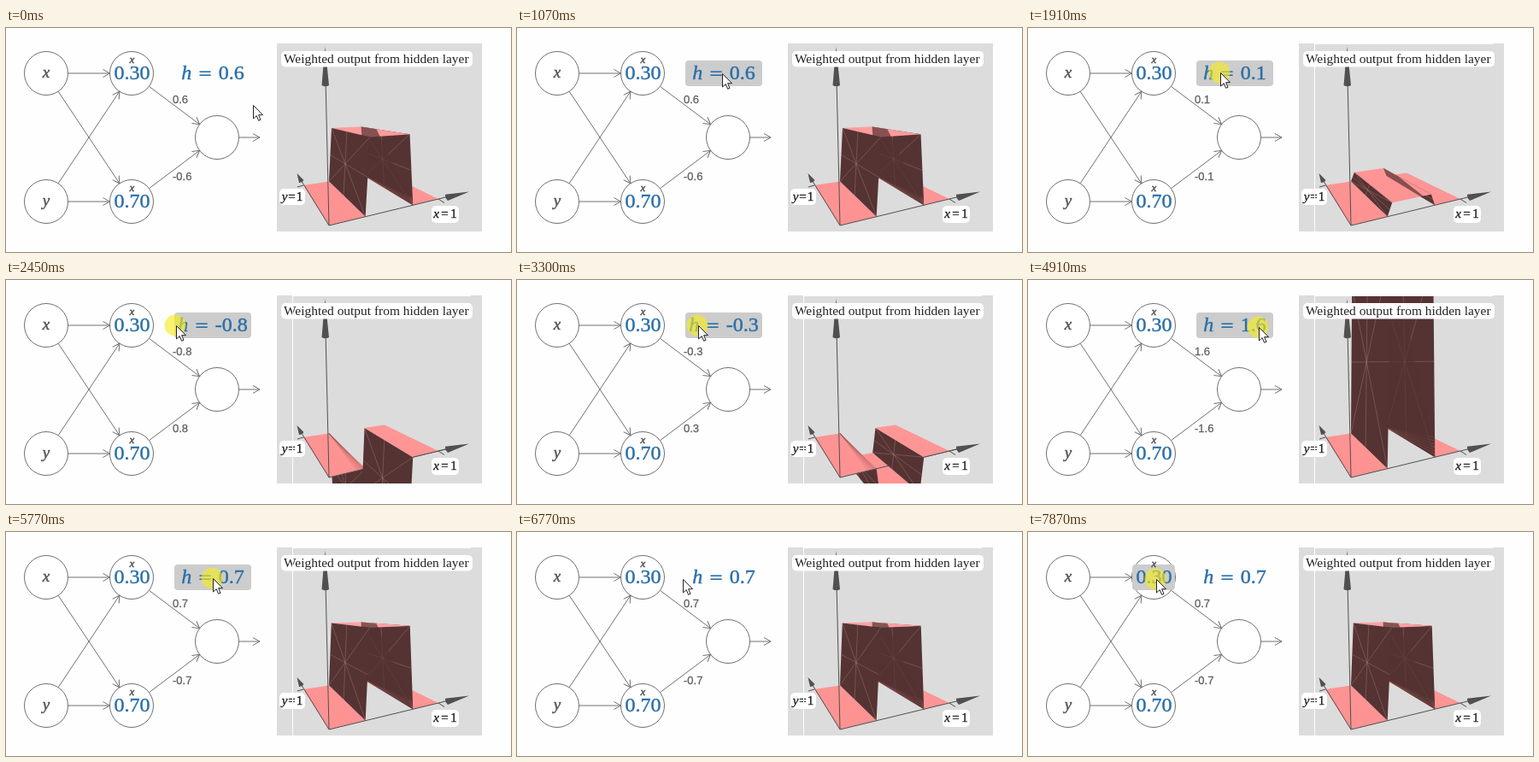
Recreate the animation shown at these times as an HTML page. Size 591 by 262 pixels, loop 8 s.

```html
<!DOCTYPE html>
<html lang="en">
<head>
<meta charset="utf-8">
<title>Weighted output</title>
<style>
html, body { margin: 0; width: 100%; height: 100%; overflow: hidden; background: #fefefe; }
svg { display: block; width: 591px; height: 262px; }
text { font-family: "Liberation Serif", "Times New Roman", serif; }
.mid { text-anchor: middle; }
.var { font-style: italic; fill: #555; stroke: #555; stroke-width: .5px; }
.val { font-size: 24px; fill: #2a6fa8; stroke: #2a6fa8; stroke-width: .45px; }
.eq { font-family: "DejaVu Serif", serif; font-size: 21px; stroke: none; }
.weight { font: 13px "Liberation Sans", Arial, sans-serif; fill: #606060; stroke: #606060; stroke-width: .3px; }
.tag { font-size: 15px; fill: #222; stroke: #222; stroke-width: .35px; }
.net { fill: none; stroke: #707070; stroke-width: 1; }
</style>
</head>
<body>
<svg viewBox="0 0 591 262">
  <defs><clipPath id="clip"><rect x="317" y="18" width="240" height="220"/></clipPath></defs>
  <rect width="591" height="262" fill="#fefefe"/>
  <g id="net" class="net"></g>
  <rect id="hover" y="38" height="30" rx="4" fill="#ccc"/>
  <text class="var mid" x="47" y="57.500" font-size="19">x</text>
  <text class="var mid" x="47" y="207.500" font-size="19">y</text>
  <text class="var mid" x="147.5" y="41" font-size="13">x</text>
  <text class="var mid" x="147.5" y="191" font-size="13">x</text>
  <text class="val mid" x="147.5" y="60">0.30</text>
  <text class="val mid" x="147.5" y="210">0.70</text>
  <text class="val mid" x="242" y="60"><tspan font-style="italic">h</tspan><tspan class="eq" dx="7">=</tspan><tspan id="height" dx="7"></tspan></text>
  <text id="top" class="weight" x="195" y="88"></text>
  <text id="bottom" class="weight" x="195" y="178"></text>
  <rect x="317" y="18" width="240" height="220" fill="#dcdcdc"/>
  <g id="plot" clip-path="url(#clip)"></g>
  <g fill="#fff">
    <rect x="322" y="27" width="224" height="18.500" rx="5"/>
    <rect x="320" y="188" width="30" height="19" rx="5"/>
    <rect x="498" y="208" width="32" height="20" rx="5"/>
  </g>
  <text x="325" y="41" font-size="15.45" fill="#222">Weighted output from hidden layer</text>
  <text class="tag mid" x="335" y="202"><tspan font-style="italic">y</tspan><tspan dx="1">=</tspan><tspan dx="1">1</tspan></text>
  <text class="tag mid" x="514" y="222"><tspan font-style="italic">x</tspan><tspan dx="2.500">=</tspan><tspan dx="2.500">1</tspan></text>
  <path id="seam" d="M335.5 18V238M335 18.500H544" stroke="#fff" fill="none"/>
  <g id="cursor">
    <circle id="press" cx="-1" cy="0" r="12.500" fill="#f4ea20"/>
    <path d="M.5 .5V16L4.200 12.600L6.600 18.300L9 17.300L6.600 11.700H11.500Z" fill="#fff" stroke="#222"/>
  </g>
</svg>
<script>
const $ = id => document.getElementById(id);
const LOOP = 8000, TICK = 76.7;
const PINK = '#fe9090', DARK = '#553333', AXIS = '#505050';
const LOW = 0.28, HIGH = 0.72, RAMP = 0.04;

// Cursor stops: time, x, y
const stops = [
  [0, 289, 90], [470, 289, 90], [1070, 240, 53], [1380, 240, 53],
  [1530, 235, 53], [1690, 235, 53], [1910, 225, 52], [2610, 192, 53],
  [2915, 192, 53], [3300, 212, 53], [3850, 241, 53], [4300, 252, 54],
  [4400, 252, 54], [4910, 270, 55], [5160, 270, 55], [5750, 242, 54],
  [6390, 242, 54], [7070, 152, 56], [7400, 152, 56], [7470, 151, 55],
  [7550, 151, 55], [7700, 150, 55], [8000, 150, 55]
];

function cursorAt(t) {
  const i = Math.max(1, stops.findIndex(s => s[0] >= t));
  const [t0, x0, y0] = stops[i - 1], [t1, x1, y1] = stops[i];
  const k = (t - t0) / (t1 - t0);
  return [x0 + (x1 - x0) * k, y0 + (y1 - y0) * k];
}

// Perspective projection of the unit plot
function project([x, y, z]) {
  const w = 1 + 0.285 * x + 0.536 * y - 0.05 * z;
  return [
    (378 + 272.2 * x + 156.5 * y - 21.85 * z) / w,
    (231 + 26 * x + 51.6 * y - 173.4 * z) / w
  ];
}

const points = list => list.map(p => project(p).map(n => n.toFixed(2)).join(' ')).join('L');
const poly = (list, fill, alpha = 1) => `<path d="M${points(list)}Z" fill="${fill}" opacity="${alpha}"/>`;
const line = (a, b, color, width = 1, alpha = 1) =>
  `<path d="M${points([a, b])}" fill="none" stroke="${color}" stroke-width="${width}" opacity="${alpha}"/>`;

// Strip running the full depth between two x positions
const strip = (x0, z0, x1, z1) => [[x0, 0, z0], [x0, 1, z0], [x1, 1, z1], [x1, 0, z1]];

function facesUp(quad) {
  const p = quad.map(project);
  const area = p.reduce((sum, a, i) => {
    const b = p[(i + 1) % 4];
    return sum + a[0] * b[1] - a[1] * b[0];
  }, 0);
  return area > 0;
}

function sheet(x0, x1, z) {
  const quad = strip(x0, z, x1, z), up = facesUp(quad);
  let s = poly(quad, up ? PINK : DARK);
  if (up) {
    const n = Math.round((x1 - x0) * 45);
    for (let i = 1; i < n; i++) {
      const x = x0 + (x1 - x0) * i / n;
      s += line([x, 0, z], [x, 1, z], '#ffb0b0', 0.5, 0.6);
    }
  }
  return s;
}

function wall(x0, z0, x1, z1) {
  const quad = strip(x0, z0, x1, z1);
  if (Math.abs(z1 - z0) < 0.05) return poly(quad, PINK);
  const xm = (x0 + x1) / 2, zm = (z0 + z1) / 2;
  let s = poly(quad, DARK);
  const rim = [...quad, [xm, 0, zm], [xm, 1, zm], [x0, 0.5, z0], [x1, 0.5, z1]];
  for (const p of rim) s += line([xm, 0.5, zm], p, '#c09090', 0.6, 0.55);
  return s;
}

// Fine strokes where the slope meets the flat part
function fan(x, dx, dz, color) {
  let s = '';
  for (let i = 1; i <= 6; i++) {
    s += line([x, 1, 0], [x + dx * i, 0, dz * i], color, 0.8, 0.75 - i * 0.1);
  }
  return s;
}

function plot(h) {
  const a = LOW + RAMP, b = HIGH - RAMP;
  const left = sheet(0, LOW, 0), right = sheet(HIGH, 1, 0), deck = sheet(a, b, h);
  const leftWall = wall(LOW, 0, a, h), rightWall = wall(b, h, HIGH, 0);
  const xAxis = from => line([from, 0, 0], [1.27, 0, 0], AXIS);
  let s;
  if (h < 0) {
    s = deck + leftWall + left + fan(LOW, -0.012, 0, '#7a4040') +
      xAxis(0) + rightWall + right + xAxis(HIGH);
  } else {
    // The far part of the right slope shows through the deck
    const shade = h >= 0.05 ? poly([[b, 1, h], [HIGH, 1, 0], [HIGH, 0, 0], [b, 0.6, h]], DARK, 0.7) : '';
    s = right + rightWall + (h > 0.1 ? fan(HIGH, -0.002, h * 0.018, PINK) : '') +
      deck + shade + leftWall + left + xAxis(0);
  }
  return s + `<path d="M378 231L374 60M378 231L344 176M506 200L513 204.500M348 184L341 186" fill="none" stroke="${AXIS}"/>` +
    `<path d="M373.300 22L369.500 67Q374 69.500 378 67ZM542 191.500L514 194.800Q513.500 199 517 202ZM340.500 170L343 181Q346.500 181 348.500 178Z" fill="${AXIS}"/>`;
}

function arrow(x0, y0, x1, y1) {
  const turn = Math.atan2(y1 - y0, x1 - x0) * 180 / Math.PI;
  return `<path d="M${x0} ${y0}L${x1} ${y1}"/>` +
    `<path d="M-8 -4.500L0 0L-8 4.500" transform="translate(${x1} ${y1}) rotate(${turn})"/>`;
}

function network() {
  const R = 25.5;
  const nodes = [[47, 53], [47, 203], [147, 53], [147, 203], [247, 128]];
  const links = [[0, 2], [1, 3], [0, 3], [1, 2], [2, 4], [3, 4]];
  const join = ([i, j]) => {
    const [x0, y0] = nodes[i], [x1, y1] = nodes[j];
    const d = Math.hypot(x1 - x0, y1 - y0), dx = (x1 - x0) / d * R, dy = (y1 - y0) / d * R;
    return arrow(x0 + dx, y0 + dy, x1 - dx, y1 - dy);
  };
  return nodes.map(([x, y]) => `<circle cx="${x}" cy="${y}" r="${R}" fill="#fff"/>`).join('') +
    links.map(join).join('') + arrow(247 + R, 128, 297, 128);
}

function heightAt(t, x) {
  if (t < 1300) return 0.6;
  if (t >= 6220) return 0.7;
  return Math.round((0.6 + (x - 240) / 30) * 10) / 10 || 0;
}

function pressAt(t) {
  if (t >= 1295 && t < 6225 || t >= 7865) return 0.64;
  return t >= 6225 && t < 6305 ? 0.32 : 0;
}

let shown = null;
function draw(t) {
  const tick = Math.floor((t + 10) / TICK) * TICK;
  const [x, y] = cursorAt(Math.min(tick, LOOP));
  const h = heightAt(t, x);
  if (h !== shown) {
    shown = h;
    $('height').textContent = h.toFixed(1);
    $('top').textContent = h.toFixed(1);
    $('bottom').textContent = (-h || 0).toFixed(1);
    $('plot').innerHTML = plot(h);
  }
  const inRow = y > 38 && y < 68;
  const dragging = t >= 1295 && t < 6225;
  const onHeight = dragging || inRow && x > 197 && x < 287;
  const onNode = !dragging && inRow && x > 122 && x < 172;
  $('hover').setAttribute('x', onNode ? 122 : 197);
  $('hover').setAttribute('width', onNode ? 50 : 90);
  $('hover').setAttribute('visibility', onHeight || onNode ? 'visible' : 'hidden');
  $('press').setAttribute('opacity', pressAt(t));
  $('seam').setAttribute('visibility', t >= 1755 ? 'visible' : 'hidden');
  $('cursor').setAttribute('transform', `translate(${Math.round(x)} ${Math.round(y)})`);
}

$('net').innerHTML = network();
const start = performance.now();
function loop() {
  draw((performance.now() - start) % LOOP);
  requestAnimationFrame(loop);
}
loop();
</script>
</body>
</html>
```
